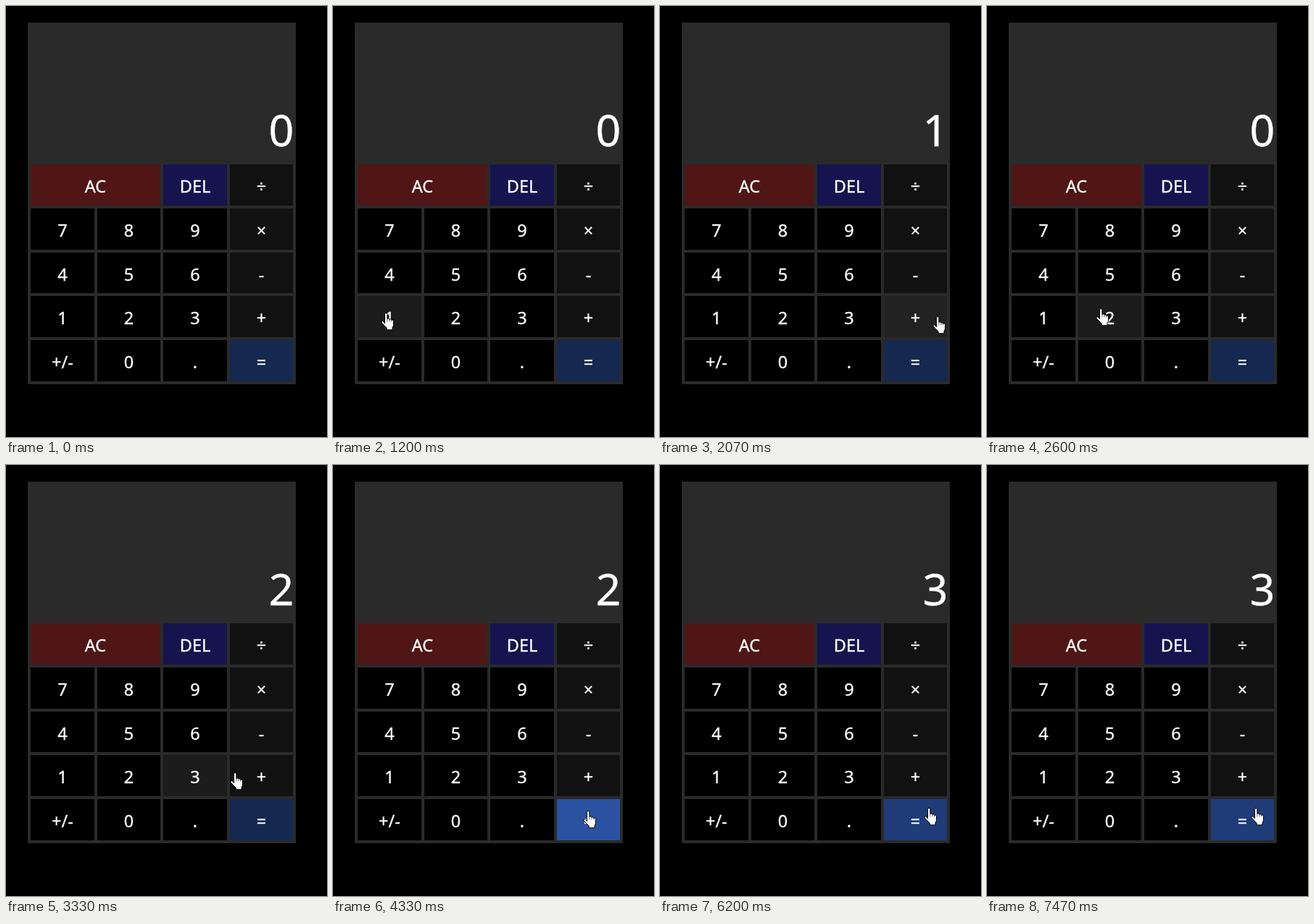
These frames come from a looping animation (443x596 px, 8000 ms). An HTML page with a canvas:

```html
<!DOCTYPE html>
<html lang="en">
<head>
<meta charset="utf-8">
<title>Calculator</title>
<style>
  html, body { margin: 0; width: 100%; height: 100%; overflow: hidden; background: #000; }
  canvas { display: block; }
</style>
</head>
<body>
<canvas id="stage" width="443" height="596"></canvas>
<script>
const ctx = document.getElementById('stage').getContext('2d');
const LOOP = 8000, STEP = 1000 / 15;

// idle, hover and pressed colours
const themes = {
  num: ['#000', '#1c1c1c', '#333'],
  op: ['#111', '#222', '#333'],
  equals: ['#142850', '#1f3c78', '#2a52a0'],
  clear: ['#501616', '#782020', '#a02c2c'],
  del: ['#16144e', '#211e75', '#2c289c']
};

const special = { AC: 'clear', DEL: 'del', '=': 'equals' };
const layout = [
  ['AC', '', 'DEL', '÷'],
  ['7', '8', '9', '×'],
  ['4', '5', '6', '-'],
  ['1', '2', '3', '+'],
  ['+/-', '0', '.', '=']
];

const buttons = layout.flatMap((row, r) => row.map((label, c) => {
  const left = 34 + 91.5 * c, top = 219.4 + 60.65 * r;
  const x = Math.round(left), y = Math.round(top);
  const span = label === 'AC' ? 179 : 87.5;
  return {
    label, x, y,
    w: Math.round(left + span) - x,
    h: Math.round(top + 56.6) - y,
    base: Math.round(top + 38.8),
    theme: themes[special[label] || (c === 3 ? 'op' : 'num')]
  };
})).filter(b => b.label);

// pointer moves, times in steps; each starts where the last one ended
const moves = [
  { from: 13, to: 20, x: 74, y: 423, power: 2 },
  { from: 24, to: 31, x: 376, y: 429, lift: 36 },
  { from: 35, to: 39, x: 150, y: 418, power: 2 },
  { from: 46, to: 50, x: 309, y: 425, power: 1 },
  { from: 50, to: 56, x: 345, y: 478, power: 2 },
  { from: 74, to: 77, x: 380, y: 477, power: 2 },
  { from: 80, to: 81, x: 384, y: 476 },
  { from: 91, to: 93, x: 364, y: 474 }
];

// a press lasts one step, then the display shows its result
const presses = [
  { at: 24, label: '1', shows: '1' },
  { at: 34, label: '+', shows: '0' },
  { at: 45, label: '2', shows: '2' },
  { at: 65, label: '=', shows: '3' },
  { at: 111, label: '×', shows: '3' }
];

const hand = new Path2D('M5.5 15V2.2a1.7 1.7 0 0 1 3.4 0V8.2q2-.8 3 .8q2-.5 2.7 1' +
  'q2.4-.3 2.9 1.6v5q0 2-1.5 4.2v3H8.2v-2.5L1 13.8q-.5-2 1.6-2q1.5.5 2.9 3.2z');
const knuckles = new Path2D('M8.9 8v4.5M11.9 9v3.5M14.6 10v2.5');

function pointerAt(n) {
  let x = -18, y = 430;
  for (const m of moves) {
    if (n <= m.from) break;
    const t = Math.min(1, (n - m.from) / (m.to - m.from));
    const e = 1 - (1 - t) ** (m.power || 3);
    x += (m.x - x) * e;
    y += (m.y - y) * e - (m.lift || 0) * 4 * e * (1 - e);
  }
  return { x, y };
}

function fillRect(color, x, y, w, h) {
  ctx.fillStyle = color;
  ctx.fillRect(x, y, w, h);
}

function write(text, size, x, y) {
  ctx.font = `${size}px "Noto Sans", "Open Sans", sans-serif`;
  ctx.fillStyle = ctx.strokeStyle = '#fff';
  ctx.lineWidth = 0.35;
  ctx.fillText(text, x, y);
  ctx.strokeText(text, x, y);
}

function drawPointer({ x, y }) {
  ctx.save();
  ctx.translate(Math.round(x), Math.round(y));
  ctx.fillStyle = '#fff';
  ctx.strokeStyle = '#000';
  ctx.fill(hand);
  ctx.lineWidth = 1;
  ctx.stroke(hand);
  ctx.lineWidth = 0.6;
  ctx.stroke(knuckles);
  ctx.restore();
}

function draw(n) {
  const trail = pointerAt(n - 0.5); // hover lags the pointer slightly
  const dx = trail.x + 7, dy = trail.y + 1;
  const isOver = b => dx >= b.x && dx < b.x + b.w && dy >= b.y && dy < b.y + b.h;
  const isPressed = b => presses.some(p => p.at === n && p.label === b.label);
  const last = presses.findLast(p => p.at < n);

  fillRect('#000', 0, 0, 443, 596);
  fillRect('#2a2a2a', 30, 23, 370, 500);
  ctx.textAlign = 'center';
  write(last ? last.shows : '0', 61, 380, 194);

  for (const b of buttons) {
    fillRect(b.theme[isPressed(b) ? 2 : isOver(b) ? 1 : 0], b.x, b.y, b.w, b.h);
    write(b.label, 23.5, b.x + b.w / 2, b.base);
  }
  drawPointer(pointerAt(n));
}

function tick() {
  draw(Math.floor((performance.now() % LOOP) / STEP + 0.1));
  requestAnimationFrame(tick);
}
tick();
</script>
</body>
</html>
```
